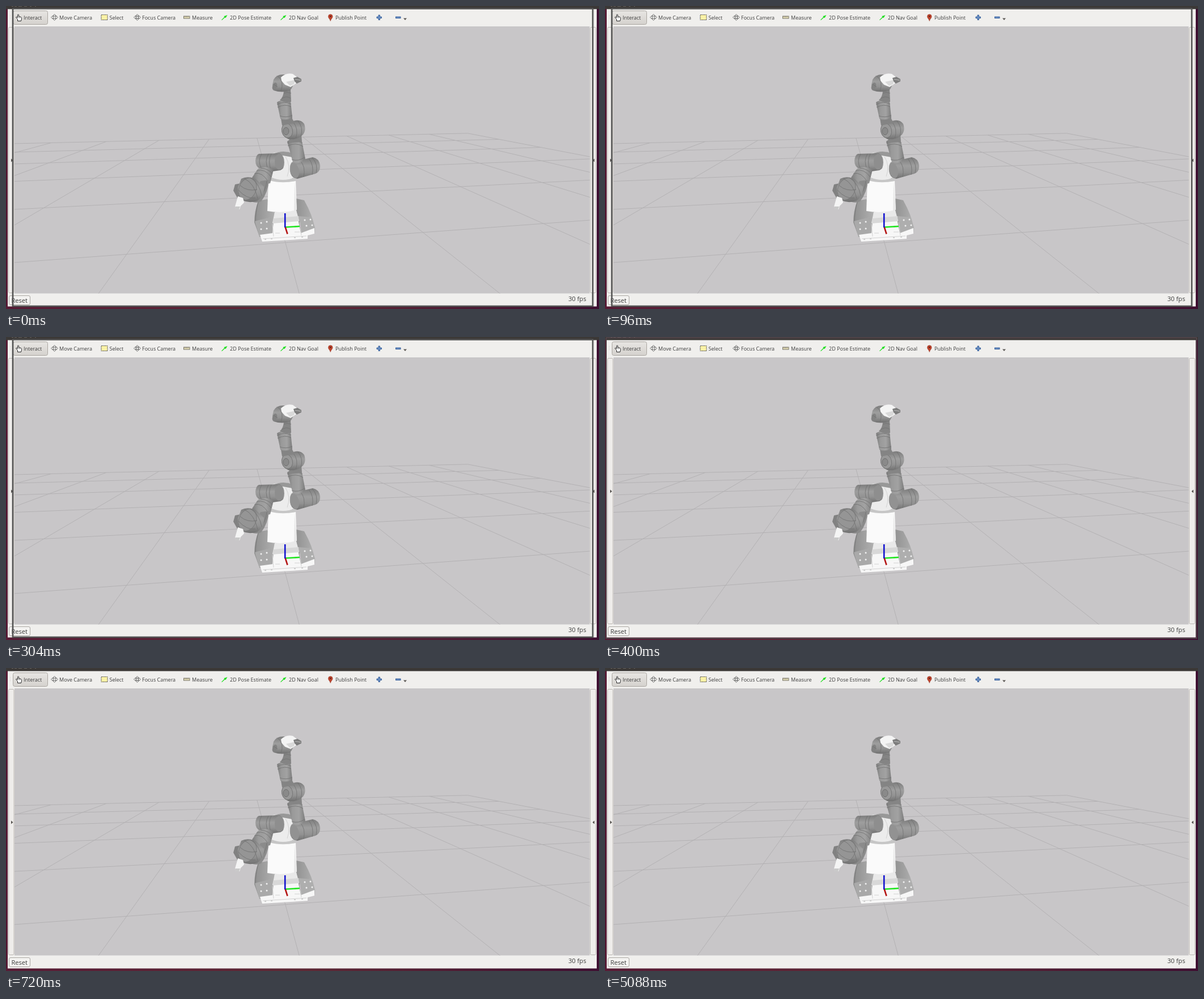
An HTML page for the animation above (8 s loop, 1046 by 535 pixels).

```html
<!DOCTYPE html>
<html lang="en">
<head>
<meta charset="utf-8">
<title>Robot viewer</title>
<style>
  html, body { margin: 0; width: 100%; height: 100%; overflow: hidden; background: #efeeec; }
  svg { display: block; width: 1046px; height: 535px; }
  text { font-family: "Open Sans", "Noto Sans", sans-serif; font-size: 9px; fill: #3c3c3c; }
  .big { font-size: 11.1px; }
  .handle { fill: #efedeb; stroke: #b9b5b1; }
  .seam { fill: none; stroke: #707070; stroke-width: .8; }
  .pale { fill: none; stroke: #d2d2d2; stroke-width: 1; }
</style>
</head>
<body>
<svg viewBox="0 0 1046 535">
  <defs>
    <linearGradient id="desk" x2="1" y2="0">
      <stop stop-color="#571b35"/><stop offset=".5" stop-color="#5d2834"/><stop offset="1" stop-color="#3e0f31"/>
    </linearGradient>
    <linearGradient id="button" x2="0" y2="1">
      <stop stop-color="#e7e5e2"/><stop offset="1" stop-color="#d5d2ce"/>
    </linearGradient>
    <linearGradient id="tube">
      <stop stop-color="#7c7c7c"/><stop offset=".3" stop-color="#9a9a9a"/>
      <stop offset=".65" stop-color="#a2a2a2"/><stop offset="1" stop-color="#7c7c7c"/>
    </linearGradient>
    <linearGradient id="barrel" x2="0" y2="1">
      <stop stop-color="#7c7c7c"/><stop offset=".4" stop-color="#9e9e9e"/>
      <stop offset=".7" stop-color="#929292"/><stop offset="1" stop-color="#707070"/>
    </linearGradient>
    <linearGradient id="track">
      <stop stop-color="#8f8f8f"/><stop offset="1" stop-color="#b0b0b0"/>
    </linearGradient>
    <clipPath id="view"><rect x="15" y="36" width="1014.5" height="471.5"/></clipPath>
  </defs>

  <rect width="1046" height="535" fill="url(#desk)"/>
  <rect x="3" y="5" width="1039" height="525.5" fill="#f0efed"/>
  <rect width="1046" height="5.5" fill="#3b3836"/>
  <path d="M10 0h3m2 0h4m3 0h6m4 0h5m5 0h3m6 0h2" stroke="#8b8884" stroke-width="1"/>

  <!-- toolbar -->
  <path d="M7.5 16v9" stroke="#c9c6c2" stroke-dasharray="1 2"/>
  <rect x="12.500" y="8.500" width="61" height="24" rx="3" fill="url(#button)" stroke="#aaa6a1"/>
  <g id="labels"></g>
  <path d="M20.500 26.500v-3l-3-3.500 1-1 2 1.500v-5q1-1 2 0v3l4 1q1.300.5 1 3l-1 4Z" fill="#fff" stroke="#222"/>
  <path d="M22.500 19v2m2-1.500v2" stroke="#555" stroke-width=".7"/>
  <g fill="#f4f4f2" stroke="#666" stroke-width=".9">
    <path d="M79.500 20l3-3v2h2v-2h-1.500l2.500-2.500 2.500 2.500h-1.500v2h2v-2l3 3-3 3v-2h-2v2h1.500l-2.500 2.500-2.500-2.500h1.500v-2h-2v2Z"/>
    <path d="M225.500 20l3-3v2h2v-2h-1.500l2.500-2.500 2.500 2.500h-1.500v2h2v-2l3 3-3 3v-2h-2v2h1.500l-2.500 2.500-2.500-2.500h1.500v-2h-2v2Z"/>
    <circle cx="231.500" cy="20" r="2"/>
  </g>
  <rect x="168" y="15.500" width="11" height="9" fill="#fbf2a6" stroke="#333" stroke-dasharray="1.500 1"/>
  <rect x="313.500" y="18" width="10.500" height="4" fill="#e5dfb9" stroke="#68645a" stroke-width=".9"/>
  <path d="M316 18v2m2.500-2v2m2.500-2v2" stroke="#68645a" stroke-width=".7"/>
  <path id="arrow" d="M380 24.500l5-5-.5-1.500 6-2-3 5-1.500-.500-5 4.500Z" fill="#20df20"/>
  <use href="#arrow" x="104"/>
  <path d="M572.300 26.500c-1-4-3.800-5-3.800-8a3.800 3.800 0 0 1 7.600 0c0 3-2.800 4-3.800 8Z" fill="#c0432c" stroke="#943522" stroke-width=".6"/>
  <circle cx="572.300" cy="18.300" r="1.300" fill="#5a2219"/>
  <g fill="#6e94c9" stroke="#2e5795" stroke-width=".9">
    <path d="M657 16h2.500v3h3v2.500h-3v3h-2.500v-3h-3v-2.500h3Z"/>
    <rect x="687.500" y="19" width="8.500" height="2.500"/>
  </g>
  <path d="M701 21.500h6l-3 3.500Z" fill="#5a5754"/>

  <!-- side handles -->
  <rect class="handle" x="4.500" y="37.500" width="9.500" height="469" rx="2"/>
  <rect class="handle" x="1030.500" y="37.500" width="10" height="469" rx="2"/>
  <path d="M9 269.500l3.500 3-3.500 3ZM1038 269.500l-3.500 3 3.500 3Z" fill="#55524f"/>

  <!-- 3D view -->
  <rect x="15" y="36" width="1014.500" height="471.500" fill="#c8c6c8"/>
  <path id="grid" clip-path="url(#view)" fill="none" stroke="#b3b1b3"/>
  <g id="robot"></g>

  <!-- status bar -->
  <rect x="5.500" y="511.500" width="37" height="16" rx="2.500" fill="#f4f3f1" stroke="#aaa7a2"/>
  <text class="big" x="9.500" y="523.500">Reset</text>
  <text class="big" x="992" y="521">30 fps</text>

  <!-- window outline around the content, then at the border -->
  <g id="outline" fill="none">
    <rect x="12" y="4.500" width="1023" height="525.500" stroke="#484848" stroke-width="2.600"/>
    <rect x="12" y="4.500" width="1023" height="525.500" stroke="#777" stroke-width=".5"/>
  </g>
  <g id="border" fill="none">
    <rect x="2" y="1.500" width="1041.500" height="530.500" stroke="#3f3036" stroke-width="2"/>
    <rect x="2" y="1.500" width="1041.500" height="530.500" stroke="#77696e" stroke-width=".6"/>
  </g>
</svg>
<script>
const $ = id => document.getElementById(id);

const labels = [
  ["Interact", 31], ["Move Camera", 94], ["Select", 182.5], ["Focus Camera", 240],
  ["Measure", 328], ["2D Pose Estimate", 395], ["2D Nav Goal", 499], ["Publish Point", 581]
];
$("labels").innerHTML = labels.map(([name, x]) => `<text x="${x}" y="23.7">${name}</text>`).join("");

// Ground grid: two families of lines meeting at two points on the horizon.
const HORIZON = 149, NEAR_X = 420, FAR_X = 4136;
const slopeOf = k => 0.987 * k - 0.716;          // x per y for the k-th line towards NEAR_X
const dropOf = i => 1 / (0.00329 + 0.00147 * i) / 4121; // fall per x for the i-th line towards FAR_X

function crossing(k, i) {
  const s = slopeOf(k), d = dropOf(i);
  const h = d * (FAR_X - NEAR_X) / (1 + d * s);
  return `${NEAR_X + s * h} ${HORIZON + h}`;
}
let grid = "";
for (let k = -4; k <= 6; k++) {
  grid += `M${crossing(k, 5)}L${NEAR_X + slopeOf(k) * 400} ${HORIZON + 400}`;
}
for (let i = 0; i <= 5; i++) {
  grid += `M0 ${HORIZON + dropOf(i) * FAR_X}L${crossing(6, i)}`;
}
$("grid").setAttribute("d", grid);

const shape = (d, fill, extra = "") => `<path d="${d}" fill="${fill}" ${extra}/>`;
const seam = d => `<path class="seam" d="${d}"/>`;
const pale = d => `<path class="pale" d="${d}"/>`;
const tube = "url(#tube)", barrel = "url(#barrel)";
const bolts = [[450, 383], [460, 381], [450, 394], [460, 393], [527, 378], [537, 377], [530, 388], [540, 387]];

const base = [
  shape("M461 341L445 344Q438 362 438 382L446 404 475 402 475 362Z", "url(#track)"),
  shape("M512 340L526 343Q541 370 544 390L543 402 514 402 508 363Z", "url(#track)"),
  seam("M445 345Q440 365 440 382"),
  shape("M439 380L466 373 471 403 447 408Z", "#a9a9a9"),
  shape("M516 371L539 373 545 391 544 402 521 404Z", "#aeaeae"),
  shape("M448 404L470 401 474 364 512 361 520 401 544 392V402L532 405V411L452 416Z", "#f7f7f7"),
  shape("M474 364L512 361 517 379 470 383Z", "#e9e9e9"),
  shape("M472 375L516 371 517 380 470 384Z", "#d8d8d8"),
  shape("M463 308H511L513 360Q488 367 461 362Z", "#fafafa"),
  shape("M509 310L513 360 508 362Z", "#e9e9e9"),
  pale("M453 411L530 406M470 385L472 407M518 382L521 405M475 401h8m26-2h9"),
  ...bolts.map(([x, y]) => `<circle cx="${x}" cy="${y}" r="1.500" fill="#f2f2f2"/>`),
  shape("M456 412h3m8-1h3m38-2h3m10-1h3", "none", 'stroke="#d0d0d0" stroke-width="2"')
];

const torso = [
  shape("M468 261Q487 254 507 260L514 297Q493 317 464 307L472 280Z", "#ececec"),
  shape("M469 262Q487 253 506 260L505 267 488 264Z", "#989898"),
  shape("M469 303Q488 311 510 303L511 309Q486 314 465 308Z", "#c6c6c6"),
  pale("M493 266Q503 282 496 301")
];

const upperArm = [
  shape("M504 276L541 267Q552 269 554 281Q555 292 546 296L514 305Q503 304 501 292Q500 281 504 276Z", barrel),
  `<ellipse cx="509" cy="290" rx="7.500" ry="14" transform="rotate(-13 509 290)" fill="#929292"/>`,
  seam("M519 273Q529 284 525 302M534 269Q544 282 540 298M540 268Q551 279 547 295"),
  shape("M496 239Q507 230 522 239L528 270Q518 281 506 276Z", tube),
  seam("M496 242Q511 235 523 242M497 247Q511 240 524 248M504 271Q516 275 527 267"),
  shape("M500 230L521 225 522 240 499 242Z", "#858585"),
  shape("M489 209Q496 202 507 203Q519 199 526 208Q530 219 524 227Q514 237 498 235Q486 230 486 218Z", barrel),
  `<ellipse cx="496" cy="220" rx="9.500" ry="12.500" transform="rotate(-12 496 220)" fill="#989898" stroke="#777"/>`,
  `<ellipse cx="494" cy="221" rx="5" ry="6.500" fill="#8a8a8a" stroke="#707070"/>`,
  seam("M506 204Q517 217 511 234M515 203Q525 215 520 230"),
  shape("M484 193L504 191Q504 203 511 206L487 211Z", "#848484"),
  shape("M478 170Q488 163 502 168L505 197Q495 203 484 199Z", tube),
  seam("M478 174Q490 167 503 173M479 179Q492 172 503 178M483 194Q494 198 505 193"),
  shape("M490 148L502 147 503 169Q493 172 483 166Q490 160 490 148Z", "#848484"),
  seam("M487 163Q495 158 502 163M490 154Q496 151 503 154"),
  shape("M472 130Q477 120 491 121L505 125Q511 138 501 149Q487 154 472 149L470 139Z", barrel),
  `<ellipse cx="474" cy="142" rx="4" ry="7" transform="rotate(16 474 142)" fill="#828282"/>`,
  seam("M480 124Q491 134 485 150M472 138L479 143"),
  shape("M485 126Q494 117 506 120L514 126 511 137 502 143 492 139 486 132Z", "#f4f4f4"),
  shape("M494 134L511 130 508 138 501 141Z", "#d9d9d9"),
  shape("M507 127L514 125 521 129 521 133 513 137 509 133Z", "#7c7c7c"),
  shape("M510 129.500L520 131", "none", 'stroke="#aaa" stroke-width="1.500"')
];

const lowerArm = [
  shape("M446 261L483 260Q491 265 491 276Q491 288 484 290L470 292 448 287Q440 284 440 273Q441 263 446 261Z", barrel),
  `<ellipse cx="482" cy="275" rx="8" ry="14" fill="#8e8e8e"/>`,
  seam("M451 261Q443 274 451 288M463 261Q455 274 463 290M468 261Q461 274 468 291"),
  shape("M444 288Q457 280 472 289L466 313 444 318 434 303Z", tube),
  seam("M442 291Q456 286 468 302M438 296Q452 292 463 311M449 286Q462 287 470 296"),
  shape("M449 309L464 307Q462 330 450 345Q441 349 433 345Z", "#8b8b8b"),
  seam("M460 309Q459 328 442 343"),
  shape("M404 315L419 312 421 338 410 342 401 326Z", "#818181"),
  shape("M415 305Q427 299 441 306L455 319Q456 335 443 344Q429 349 417 343Q408 336 409 320Z", barrel),
  `<ellipse cx="426" cy="323" rx="15" ry="20" transform="rotate(24 426 323)" fill="#959595" stroke="#7c7c7c"/>`,
  seam("M421 305Q438 313 444 340M431 303Q447 313 451 335M410 325Q424 341 440 339M413 317Q426 328 443 324"),
  shape("M409 336L418 339 420 347 414 353 412 359 406 359 404 354Z", "#f4f4f4"),
  shape("M404 354L413 354 411 359 406 360Z", "#c8c8c8")
];

const axis = (d, color) => `<path d="${d}" fill="none" stroke="${color}" stroke-width="2.600"/>`;
const axes = [
  axis("M492.500 390.500L518 389", "#1fe51f"),
  axis("M492.500 390L496.500 402.500", "#b41414"),
  axis("M492.200 391V366", "#1212cf")
];

$("robot").innerHTML = [...base, ...torso, ...upperArm, ...lowerArm, ...axes].join("");

const LOOP = 8000;
const show = (id, on) => $(id).setAttribute("visibility", on ? "visible" : "hidden");

function draw(ms) {
  const t = ms % LOOP;
  show("outline", t < 400);
  show("border", t >= 400 && t < 560);
}

const start = performance.now();
function tick() {
  draw(performance.now() - start);
  requestAnimationFrame(tick);
}
draw(0);
requestAnimationFrame(tick);
</script>
</body>
</html>
```
